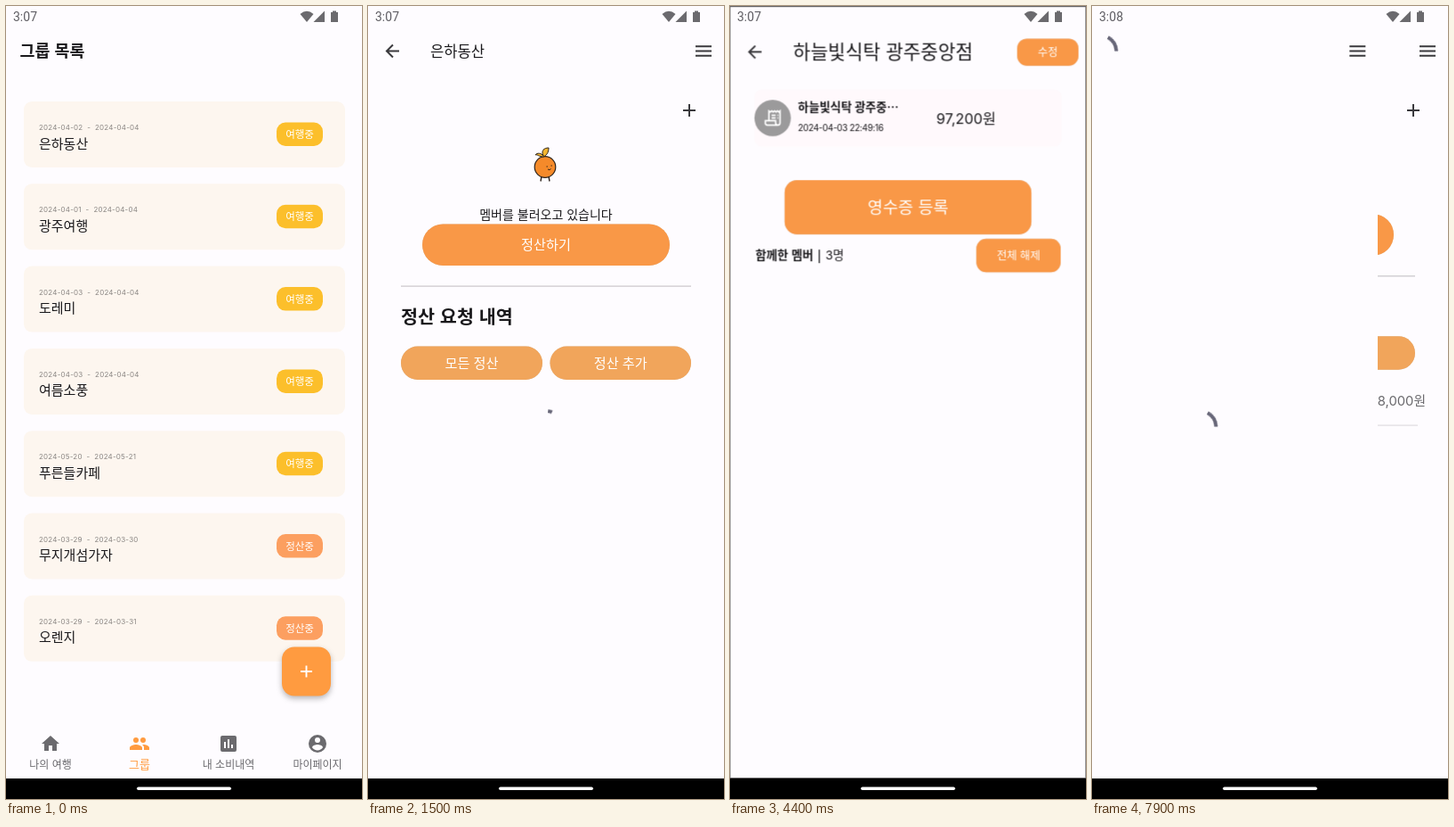
An HTML page that plays this animation: 400x889 px, repeating every 8000 ms.

```html
<!DOCTYPE html>
<html lang="ko">
<head>
<meta charset="utf-8">
<title>여행 정산</title>
<style>
html, body { margin: 0; width: 100%; height: 100%; overflow: hidden; background: #fefcff; }
svg { display: block; width: 100%; height: 100%; }
text { font-family: "Noto Sans CJK KR", "Noto Sans CJK", "Noto Sans", sans-serif; fill: #1a191c; white-space: pre; }
.num { font-family: Inter, "Noto Sans CJK KR", "Noto Sans CJK", sans-serif; }
.clock { font-family: Roboto, sans-serif; fill: #5f5e63; }
.bold { font-weight: 700; }
.mid { text-anchor: middle; }
.end { text-anchor: end; }
.white { fill: #fff; }
.grey { fill: #6b6a6e; }
.soft { fill: #8a8683; letter-spacing: .2px; }
.tight { letter-spacing: -.35px; }
.orange { fill: #ff9b40; }
.amber { fill: #dd7a22; }
.paper { fill: #fefcff; }
.btn { filter: drop-shadow(0 .7px .6px rgba(90, 50, 20, .25)); }
.fab { filter: drop-shadow(0 3px 3px rgba(0, 0, 0, .28)); }
.line { fill: none; stroke: #3a393d; stroke-width: 2; }
.zoom { transform-origin: 200px 444px; }
.scrim { opacity: 0; }
</style>
</head>
<body>
<svg id="stage" viewBox="0 0 400 889"></svg>
<script>
const LOOP = 8000;
const css = [];

// Times are in ms within the loop.
function frames(name, ease, steps) {
  const body = Object.entries(steps).map(([ms, s]) => `${ms * 100 / LOOP}%{${s}}`).join('');
  css.push(`@keyframes ${name}{${body}}.${name}{animation:${name} ${LOOP}ms ${ease} infinite}`);
}

// Hidden at first, then switched at each given time.
function show(name, ...edges) {
  const steps = { 0: 'opacity:0' };
  edges.forEach((ms, i) => { steps[ms] = `opacity:${i % 2 ? 0 : 1}`; });
  frames(name, 'step-end', steps);
}

function slide(name, from, start, end) {
  const out = `transform:translateX(${from}px)`;
  frames(name, 'linear', { 0: out, [start]: out, [end]: 'transform:translateX(0px)' });
}

function zoom(name, start) {
  frames(name, 'linear', {
    0: 'opacity:0;transform:scale(.85)',
    [start]: 'transform:scale(.85);animation-timing-function:cubic-bezier(.05,.7,.1,1)',
    [start + 38]: 'opacity:0',
    [start + 75]: 'opacity:1',
    [start + 300]: 'transform:scale(1)'
  });
  frames(name + 'Scrim', 'linear', {
    0: 'opacity:0', [start + 62]: 'opacity:0', [start + 125]: 'opacity:.6',
    [start + 300]: 'opacity:.6', [start + 301]: 'opacity:0'
  });
}

// The arc's start and length both grow with the square of time.
function spin(name, start) {
  const end = Math.min(start + 400, LOOP), part = ((end - start) / 400) ** 2;
  const from = 'transform:rotate(-90deg);stroke-dasharray:0 360';
  frames(name, 'linear', {
    0: from,
    [start]: from + ';animation-timing-function:cubic-bezier(.333,0,.667,.333)',
    [end]: `transform:rotate(${-90 + 78 * part}deg);stroke-dasharray:${166 * part} 360`
  });
}

// Switch states from off to on: track, thumb.
const box = (x, y, w, h, fill) => `x:${x}px;y:${y}px;width:${w}px;height:${h}px;fill:${fill}`;
const states = [
  ['fill:#706f73;stroke:#706f73', box(8, 7.5, 16, 16, '#fff')],
  ['fill:#948880;stroke:#6f6b6e', box(9, 4.5, 33, 22, '#fbebd9')],
  ['fill:#e3b893;stroke:#b9957d', box(25, 3.5, 24, 24, '#f5ac60')],
  ['fill:#ffcb9c;stroke:#ffcb9c', box(23.5, 3.5, 24, 24, '#ff9b40')]
];
function press(name, steps) {
  ['Track', 'Thumb'].forEach((part, i) => {
    const list = Object.entries(steps).map(([ms, n]) => [ms, states[n][i]]);
    frames(name + part, 'linear', Object.fromEntries(list));
  });
}
[['off', 0], ['on', 3]].forEach(([name, n]) =>
  css.push(`.${name}Track{${states[n][0]}}.${name}Thumb{${states[n][1]}}`));

frames('sharpen', 'linear', { 0: 'opacity:0', 900: 'opacity:1' });
show('early', 0, 6000);
show('late', 6000);
show('detailOn', 1180, 2600, 7650);
show('loading', 1180, 1750);
show('loaded', 1750);
show('billsOn', 2200, 7650);
show('membersOn', 4200, 6800);
show('memberRows', 4700);
show('shareAll', 0, 5000, 5500);
show('shareTwo', 5000, 5500);
show('returnOn', 6800, 7100);
show('reloadOn', 7660);
zoom('openDetail', 1180);
zoom('openMembers', 4200);
slide('openBills', 400, 2200, 2500);
slide('returnBills', -134, 6800, 6900);
slide('reloadDetail', -400, 7660, 7960);
spin('spinOpen', 1380);
spin('spinReload', 7660);
press('tap', { 0: 0, 3700: 0, 3800: 1, 3900: 2, 4000: 3, 8000: 3 });
press('retap', { 0: 3, 5000: 3, 5100: 2, 5200: 1, 5300: 0, 5500: 0, 5600: 1, 5700: 2, 5800: 3, 8000: 3 });

// Drawing helpers
const g = (cls, ...parts) => `<g class="${cls}">${parts.join('')}</g>`;
const at = (x, y, ...parts) => `<g transform="translate(${x} ${y})">${parts.join('')}</g>`;
const text = (x, y, s, size, cls = '') => `<text x="${x}" y="${y}" font-size="${size}" class="${cls}">${s}</text>`;
const rect = (x, y, w, h, fill, r = 0, more = '') =>
  `<rect x="${x}" y="${y}" width="${w}" height="${h}" rx="${r}" fill="${fill}" ${more}/>`;
const disc = (x, y, r, fill) => `<circle cx="${x}" cy="${y}" r="${r}" fill="${fill}"/>`;
const path = (d, more = 'class="line"') => `<path d="${d}" ${more}/>`;
const rule = (x1, x2, y, color = '#dedce0') => rect(x1, y - .5, x2 - x1, 1.2, color);
const button = (x, y, w, h, r, label, size, fill = '#f99847') =>
  rect(x, y, w, h, fill, r, 'class="btn"') +
  text(x + w / 2, y + h / 2 + size * .37, label, size, 'mid white');
const paper = '<rect class="paper" width="400" height="866"/>';
const back = path('M35 50.5H21.5M28 43.5L21 50.5L28 57.5');
const menu = path('M368 45.3h18M368 50.5h18M368 55.7h18');
const plus = path('M354 117h14M361 110v14');
const spinner = (x, y, cls) => at(x, y,
  `<circle r="18" pathLength="360" class="${cls}" fill="none" stroke="#686779" stroke-width="4"/>`);
const toggle = (x, y, cls) => at(x, y,
  `<rect x="1" y="1" width="49" height="29" rx="14.5" stroke-width="2" class="${cls}Track"/>`,
  `<rect rx="12" class="${cls}Thumb"/>`);

// Group list
const trips = [
  ['2024-04-02  -  2024-04-04', '은하동산'],
  ['2024-04-01  -  2024-04-04', '광주여행'],
  ['2024-04-03  -  2024-04-04', '도레미'],
  ['2024-04-03  -  2024-04-04', '여름소풍'],
  ['2024-05-20  -  2024-05-21', '푸른들카페'],
  ['2024-03-29  -  2024-03-30', '무지개섬가자'],
  ['2024-03-29  -  2024-03-31', '오렌지']
];
const tripCard = ([dates, name], i) => at(0, 107 + 92.3 * i,
  rect(20, 0, 361, 74, '#fdf6ef', 9),
  rect(20.5, .5, 360, 73, 'none', 9, 'stroke="#fbebd8" stroke-width="1.5" class="sharpen"'),
  text(37, 32, dates, 8, 'num soft'),
  text(37, 52.5, name, 15),
  rect(304, 23.5, 52, 26.5, i < 5 ? '#fcbf2b' : '#fc9f60', 10),
  text(330, 41, i < 5 ? '여행중' : '정산중', 11.5, 'mid white'));
const tabs =
  at(38, 815, path('M10 20v-6h4v6h5v-8h3L12 3 2 12h3v8z', 'class="grey"')) +
  at(138, 815, g('orange', '<circle cx="8" cy="8" r="3"/><circle cx="16" cy="8" r="3"/>',
    path('M1 19v-2.5C1 14.2 5.7 13 8 13s7 1.2 7 3.5V19zM17 19v-2.5c0-1.5-.8-2.6-2-3.4 3-.5 8 .9 8 3.4V19z', ''))) +
  rect(241, 818, 18, 18, '#6b6a6e', 2) + path('M246 832v-7M250 832v-10M254 832v-4', 'stroke="#fefcff" stroke-width="2"') +
  disc(350, 827, 10, '#6b6a6e') + disc(350, 823, 3, '#fefcff') +
  path('M344 831.2c0-2 4-3.1 6-3.1s6 1.1 6 3.1a7.2 7.2 0 0 1-12 0z', 'class="paper"') +
  text(50, 854.5, '나의 여행', 12, 'mid grey') + text(150, 854.5, '그룹', 13, 'mid orange') +
  text(250, 854.5, '내 소비내역', 12, 'mid grey') + text(350, 854.5, '마이페이지', 12, 'mid grey');
const groupPage = paper + text(15.5, 57, '그룹 목록', 18.4, 'bold') + trips.map(tripCard).join('') +
  rect(310, 718.5, 55, 55, '#ff9b40', 14, 'class="fab"') +
  path('M331 746h13M337.5 739.5v13', 'stroke="#fff" stroke-width="1.9"') +
  g('sharpen', rule(0, 400, 807.5, '#eeecef')) + tabs;

// Avatars, drawn around their centre
const fox = (x, y) => at(x, y, path('M-9-3L-10-14 0-7 10-14 9-3 0 9z', 'fill="#d3ad7f"'),
  path('M-6-1L0 8 6-1z', 'fill="#f1e2cb"'), disc(-3.5, -1, 1.2, '#33271e'), disc(3.5, -1, 1.2, '#33271e'), disc(0, 6, 1.4, '#33271e'));
const avatars = [
  disc(0, 0, 28, '#6e6a55') + path('M-27 7Q0-10 27 7A28 28 0 0 1-27 7z', 'fill="#a07c52"') +
    fox(-13, 13) + fox(10, 9) + fox(-1, -6),
  disc(0, 0, 28, '#c9b3a2') + path('M-20-18Q0-30 20-18L16 22Q0 30-16 22z', 'fill="#ddcfc3"') +
    path('M-8-8L-8-19-3-14H3L8-19 8-7Q0 0-8-8z', 'fill="#b98c66"') + rect(-9, -11, 18, 5, '#29262a', 2) +
    path('M-12 2Q0-4 12 2L7 13H-7z', 'fill="#3a3536"') + rect(-7, 12, 5, 8, '#b98c66', 2.5) + rect(2, 12, 5, 8, '#b98c66', 2.5),
  disc(0, 0, 28, '#8fb7d8') + disc(0, -4, 9.5, '#c9dcea') + path('M-18 21.4C-15 4 15 4 18 21.4A28 28 0 0 1-18 21.4z', 'fill="#c9dcea"')
];
const people = ['정하린', '한도윤', '오민후'];

// Group detail
const mascot =
  path('M195 191l-1 5.5M203 191l1 5.5', 'stroke="#2b211a" stroke-width="1.4"') +
  `<circle cx="199" cy="180.5" r="11.8" fill="#f58a2a" stroke="#2b211a" stroke-width="1.2"/>` +
  path('M197 169C192 169 190 166 188 167C190 164 195 165 197 168C194 162 198 159 203 159C203 165 200 168 197 169z',
    'fill="#f3b52f" stroke="#2b211a" stroke-width="1"') +
  path('M200.5 180h1.4M205.5 179h1.4M202 183q2 1.6 3.5-.4', 'fill="none" stroke="#2b211a" stroke-width="1"');
const settle =
  button(61, 244.5, 278, 46.5, 23.2, '정산하기', 15.2) +
  rule(37, 363, 314, '#c9c6ca') + text(37, 356, '정산 요청 내역', 20.7, 'bold') +
  button(37, 381.5, 159, 37.5, 18.7, '모든 정산', 15.2, '#f1a55b') +
  button(204.5, 381.5, 158.5, 37.5, 18.7, '정산 추가', 15.2, '#f1a55b');
const detailPage = paper + back + menu + plus + text(70, 56.5, '은하동산', 16.6) +
  g('loading', mascot, text(200, 239, '멤버를 불러오고 있습니다', 14, 'mid'), settle, spinner(200, 472, 'spinOpen')) +
  g('loaded',
    people.map((name, i) => at(67 + 72 * i, 147, avatars[i], text(0, 48, name, 12, 'mid'))).join(''),
    at(0, -11.3, settle), text(375, 447.5, '48,000원', 14.8, 'num end grey'), rule(37, 366, 470));
const reloadPage = paper + back + menu + spinner(88, 51, 'spinReload') + spinner(200, 472, 'spinReload');

// Settlement requests
const shops = [
  ['하늘빛식탁 광주중⋯', '97,200원'],
  ['구름QLT커피 광⋯', '6,000원'],
  ['들꽃앤솥 광주 중앙점', '67,400원'],
  ['노을카츠 중앙점', '17,000원']
];
const times = ['49:16', '49:02', '48:55', '48:54', '47:00', '46:46', '46:39', '46:38', '43:54'];
const receipt = path('M-4.5 3V-8l1.6 1.2L-1.3-8 .3-6.8 1.9-8 3.5-6.8 5.1-8 6.7-6.8 8-8V5.5A2.5 2.5 0 0 1 5.5 8H-6.5A2.3 2.3 0 0 1-8.5 5.5V3H3V5.5A2.5 2.5 0 0 0 5.5 8M-1.5-3H3M-1.5 0H3M5-3h1M5 0h1',
  'fill="none" stroke="#fff" stroke-width="1.7"');
const billRow = (y, [shop, sum], time, h = 64) => at(0, y,
  rect(27, -32, 346, h, '#fff9fc', 8), disc(47.5, 0, 20.5, '#9b9a9b'), at(47.8, 0, receipt),
  text(76, -7, shop, 13.2, 'bold num'), text(76, 15, '2024-04-03 22:' + time, 10, 'num tight'),
  text(299, 7, sum, 16.3, 'num end'));
const billsHead = back + text(70.5, 58.5, '내 정산 요청', 21.5) +
  text(200, 96.8, '정산할 항목들을 선택해주세요', 14, 'mid') +
  button(51, 113.5, 151, 42.5, 13, '영수증 일괄 등록', 15.2) +
  button(211, 113.5, 138, 42.5, 13, '현금 계산 추가', 15.2);
const billsPage = paper + billsHead + times.map((time, i) => {
  const y = 204.3 + 75.3 * i, last = i === 8;
  return billRow(y, last ? ['한도윤', '19,899원'] : shops[i % 4], time, last ? 55 : 64) +
    toggle(306, y - 15.3, i ? 'off' : 'tap') + (last ? '' : rule(14, 386, y + 37.4));
}).join('');

// Members of one bill
const memberY = i => 344.7 + 70 * i;
const shares = (...sums) => sums.map((s, i) => text(97, memberY(i) + 17.3, s, 16.3, 'num amber')).join('');
const membersPage = paper + back + text(70.5, 58.5, '하늘빛식탁 광주중앙점', 21.4) +
  button(323, 35.5, 69, 30.5, 11, '수정', 12.3) +
  billRow(124.7, shops[0], times[0]) +
  button(61, 194.5, 278, 61, 14, '영수증 등록', 18.7) +
  text(28, 284, '함께한 멤버', 13.4, 'bold') + text(98, 284, '|', 13.4, 'bold') + text(107, 284, '3명', 13.6, 'num') +
  button(277, 260.5, 95, 37.5, 11, '전체 해제', 12.4) +
  g('memberRows',
    people.map((name, i) => at(53, memberY(i), avatars[i]) +
      text(97, memberY(i) - 5.7, name, 13.3, 'bold') +
      toggle(312, memberY(i) - 15.3, i === 1 ? 'retap' : 'on')).join(''),
    g('shareAll', shares('32,400원', '32,400원', '32,400원')),
    g('shareTwo', shares('48,600원', '0원', '48,600원')),
    '<circle cx="40" cy="826" r="9" class="line"/>', path('M40 825v5.5M40 821v2'),
    text(57, 830.7, '자투리 금액', 13.3, 'bold'), text(126.5, 830.7, '|', 13.3, 'bold'),
    text(137, 830.7, '0원', 13, 'num amber'));

// System bars
const bars = g('early', text(8, 17, '3:07', 14, 'clock')) + g('late', text(8, 17, '3:08', 14, 'clock')) +
  g('grey', path('M338 18L330.5 9Q338 2.5 345.5 9z', ''), path('M358 5.5V18H345.5z', ''),
    path('M365 7h2V5.5h4V7h2v11h-8z', '')) +
  rect(0, 866, 400, 23, '#000') + rect(147, 875.5, 106, 3.6, '#fff', 1.8);

const scrim = cls => g('scrim ' + cls, rect(0, 0, 400, 866, '#000'));
document.getElementById('stage').innerHTML =
  groupPage + scrim('openDetailScrim') +
  g('detailOn', g('zoom openDetail', detailPage)) +
  g('billsOn', g('openBills', billsPage)) +
  g('returnOn', g('returnBills', paper, billsHead)) +
  scrim('openMembersScrim') +
  g('membersOn', g('zoom openMembers', membersPage)) +
  g('reloadOn', g('reloadDetail', reloadPage)) + bars;

const style = document.createElement('style');
style.textContent = css.join('\n');
document.head.append(style);
</script>
</body>
</html>
```
